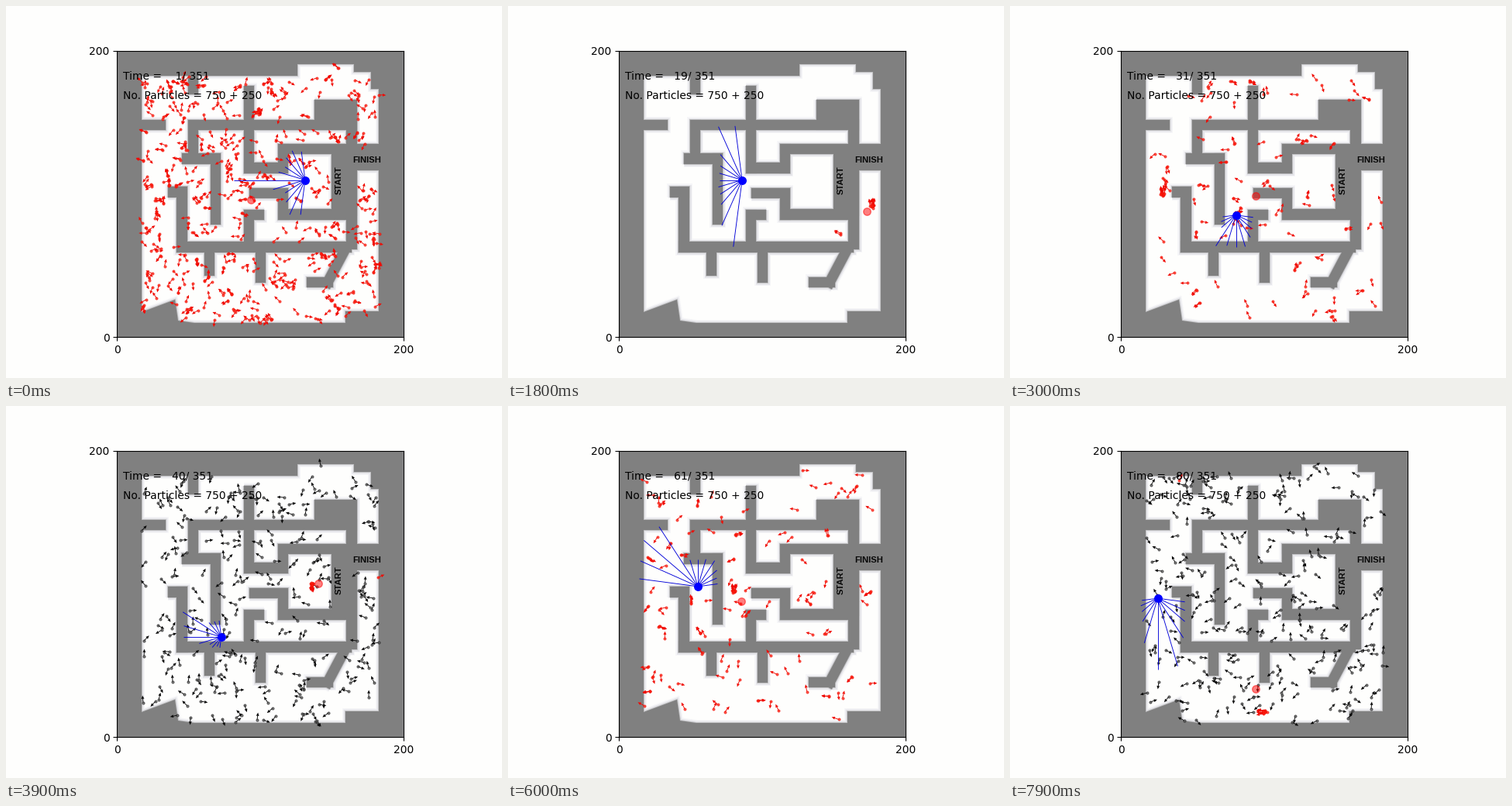
These frames come from a looping animation (640x480 px, 8 s). A matplotlib script:

```python
import numpy as np
import matplotlib.pyplot as plt
from matplotlib.animation import FuncAnimation
from matplotlib.collections import LineCollection, PolyCollection
from matplotlib.patches import PathPatch
from matplotlib.path import Path

PT = 0.72            # points per pixel at 100 dpi
X0, X1, Y0, Y1 = 143.2, 512.8, 57.6, 427.2
STEPS, ROUND = 80, 10
PAGE, WALL = "#fefefd", "#808080"


# ---- maze -----------------------------------------------------------
def shape(pts):
    return Path(list(pts) + [pts[0]])


def box(x0, y0, x1, y1):
    return shape([(x0, y0), (x1, y0), (x1, y1), (x0, y1)])


def bars(*pts, half=6.6):
    """Thick wall along a centre line, square at its corners."""
    z = [complex(*p) for p in pts]
    out = []
    for i, (p, q) in enumerate(zip(z, z[1:])):
        d = half * (q - p) / abs(q - p)
        p = p - d if i else p
        q = q + d if i < len(z) - 2 else q
        ring = (p + 1j * d, q + 1j * d, q - 1j * d, p - 1j * d)
        out.append(shape([(c.real, c.imag) for c in ring]))
    return out


floor = shape([(175, 90), (235, 90), (235, 114), (248, 114), (248, 90),
               (376, 90), (376, 75), (449, 75), (449, 85), (471, 85),
               (471, 107), (481, 107), (481, 394), (438, 394), (438, 409),
               (243, 409), (222, 406), (218, 379), (175, 395),
               (175, 160), (206, 160), (206, 147), (175, 147)])
inner = [box(398, 121, 453, 160), box(420, 184, 453, 270),
         box(446, 178, 483, 212),
         *bars((241.5, 197), (241.5, 153.5), (446, 153.5), (446, 314)),
         *bars((227, 197), (270.5, 197), (270.5, 282)),
         *bars((313.5, 103), (313.5, 209), (357.5, 209), (357.5, 184.5),
               (446, 184.5)),
         *bars((314, 241.5), (357.5, 241.5), (357.5, 269), (446, 269)),
         *bars((209, 240), (227, 240), (227, 311), (446, 311)),
         *bars((333, 269.5), (313.5, 269.5), (313.5, 311)),
         *bars((262.5, 311), (262.5, 348)),
         *bars((328.5, 311), (328.5, 357)),
         *bars((388, 356.5), (415, 356.5), (437, 315))]
outer = Path.make_compound_path(box(X0, Y0, X1, Y1),
                                Path(floor.vertices[::-1]))

gy, gx = np.mgrid[57:428, 143:514]
grid = np.column_stack([gx.ravel(), gy.ravel()])
solid = ~floor.contains_points(grid)
for wall in inner:
    solid |= wall.contains_points(grid)
free = grid[~solid]
solid = solid.reshape(gx.shape)


def blocked(z):
    col = np.clip(np.real(z) - 143, 0, 370).astype(int)
    row = np.clip(-np.imag(z) - 57, 0, 370).astype(int)
    return solid[row, col]


# ---- robot: complex positions, y pointing up; constant speed ---------
SPEED = 4.66
ROUTE = np.array([386 - 224.5j, 291.5 - 224.5j, 291.5 - 298j, 245 - 298j,
                  245 - 223.5j, 190.5 - 223.5j, 190.5 - 400j])
LEGS = np.diff(ROUTE)
MILES = np.concatenate([[0], np.cumsum(abs(LEGS))])


def robot(t):
    return np.interp(SPEED * (t - 1), MILES, ROUTE)


def heading(t):
    leg = np.searchsorted(MILES, SPEED * (t - 1), "right") - 1
    return np.angle(LEGS[leg])


def rays(t):
    rng = np.random.default_rng(500 + t)
    start, reach = robot(t), np.arange(2, 92)
    lines = []
    for a in heading(t) + np.radians(np.linspace(-82.5, 82.5, 11)):
        hit = blocked(start + reach * np.exp(1j * a))
        dist = reach[hit.argmax()] + 5 if hit.any() else 91
        end = start + min(dist + rng.normal(0, 1), 92) * np.exp(1j * a)
        lines.append([(start.real, -start.imag), (end.real, -end.imag)])
    return lines


# ---- particles ------------------------------------------------------
# Where each round's best guess ends up, and its heading in degrees
GUESS = [(471 - 303j, 90), (471 - 257j, 90), (197 - 252j, 90),
         (395 - 225j, 270), (300 - 181j, 255), (291 - 248j, 90),
         (203 - 301j, 300), (333 - 394j, 180)]


def fresh(n, count):
    """Random particles thrown in just before round n."""
    rng = np.random.default_rng(40 + n)
    p = free[rng.integers(len(free), size=count)]
    return p[:, 0] - 1j * p[:, 1], rng.uniform(0, 2 * np.pi, count)


def carry(z, a, ref, t):
    """Each particle repeats the robot's motion in its own frame."""
    shift = robot(t) - robot(ref)
    return (z + shift * np.exp(1j * (a - heading(ref))),
            a + heading(t) - heading(ref))


def copies(z, a, count, spread, rng):
    z, a = np.repeat(z, count), np.repeat(a, count)
    dx, dy = rng.normal(0, spread, (2, len(z)))
    return z + dx + 1j * dy, a + rng.normal(0, 0.15, len(a))


def best(n, t):
    z, deg = GUESS[n]
    return carry(np.array([z]), np.radians([deg]), ROUND * (n + 1) - 1, t)


def red_cloud(t):
    """Survivors thin out after each injection until one guess is left."""
    n, k = divmod(t - 1, ROUND)
    k += 1
    rng = np.random.default_rng(31 + t)
    total = 100 if n else 360
    z, a = fresh(n, total)
    left = int(total / k ** 2)
    z, a = carry(z[:left], a[:left], max(ROUND * n, 1), t)
    z, a = z[~blocked(z)], a[~blocked(z)]
    count = rng.choice([1, 2, 3], len(z), p=[0.75, 0.2, 0.05])
    clouds = [copies(z, a, count, 0.7, rng)]
    if n or k > 1:
        z, a = best(n if k > 1 else n - 1, t)
        if not blocked(z)[0]:
            clouds.append(copies(z, a, 9, 1.4, rng))
    return tuple(np.concatenate(c) for c in zip(*clouds))


# ---- figure ---------------------------------------------------------
fig, ax = plt.subplots(figsize=(6.4, 4.8), dpi=100, facecolor=PAGE)
ax.set(xlim=(X0, X1), ylim=(Y1, Y0), aspect="equal", facecolor=PAGE)
ax.set_xticks([X0, X1], ["0", "200"])
ax.set_yticks([Y1, Y0], ["0", "200"])

for color, width in (("#f6f6f8", 8), ("#e6e6ea", 5), ("#bcbcbe", 1.8)):
    for wall in [outer] + inner:
        ax.add_patch(PathPatch(wall, fc="none", ec=color, lw=width * PT))
for wall in [outer] + inner:
    ax.add_patch(PathPatch(wall, fc=WALL, ec="none"))

sign = dict(family="Liberation Sans", weight="bold", size=11.3 * PT,
            color="#080808", ha="center", va="center")
ax.text(466, 199.5, "FINISH", **sign)
ax.text(430, 225, "START", rotation=90, **sign)


class Cloud:
    """Dots with a small arrow showing each heading."""

    def __init__(self, color, dot, z):
        self.shafts = LineCollection([], colors=color, linewidths=0.9 * PT,
                                     zorder=z)
        self.heads = PolyCollection([], facecolors=color, edgecolors="none",
                                    zorder=z)
        ax.add_collection(self.shafts)
        ax.add_collection(self.heads)
        self.dots = ax.scatter([], [], s=(3.2 * PT) ** 2, c=dot,
                               edgecolors=color, linewidths=0.5, alpha=0.75,
                               zorder=z)

    def show(self, z, a):
        d = np.exp(1j * a)
        tip, neck, side = z + 9.5 * d, z + 5.2 * d, 1.9j * d

        def xy(*pts):
            return np.stack([np.column_stack([p.real, -p.imag])
                             for p in pts], axis=1)

        self.shafts.set_segments(list(xy(z, neck)))
        self.heads.set_verts(list(xy(tip, neck + side, neck - side)))
        self.dots.set_offsets(np.column_stack([z.real, -z.imag]))


black = Cloud("#080808", "#606060", 3)
red = Cloud("#f00800", "#ff2010", 4)
mean_dot, = ax.plot([], [], "o", color="red", ms=9.5 * PT, alpha=0.5, zorder=5)
beams = LineCollection([], colors="#0000d8", linewidths=0.9 * PT, zorder=6)
ax.add_collection(beams)
body, = ax.plot([], [], "o", color="blue", ms=9.5 * PT, zorder=7)
clock = ax.text(150.6, 94.6, "", size=10, zorder=8)
ax.text(150.6, 119.9, "No. Particles = 750 + 250", size=10, zorder=8)


def draw(i):
    t = i + 1
    z, a = red_cloud(t)
    red.show(z, a)
    black.show(*fresh(t // ROUND, 0 if t % ROUND else 250))
    mean_dot.set_data([z.real.mean()], [-z.imag.mean()])
    beams.set_segments(rays(t))
    here = robot(t)
    body.set_data([here.real], [-here.imag])
    clock.set_text(f"Time = {t:4d}/ 351")
    return []


anim = FuncAnimation(fig, draw, frames=STEPS, interval=100, repeat=True,
                     repeat_delay=0)
plt.show()
```
